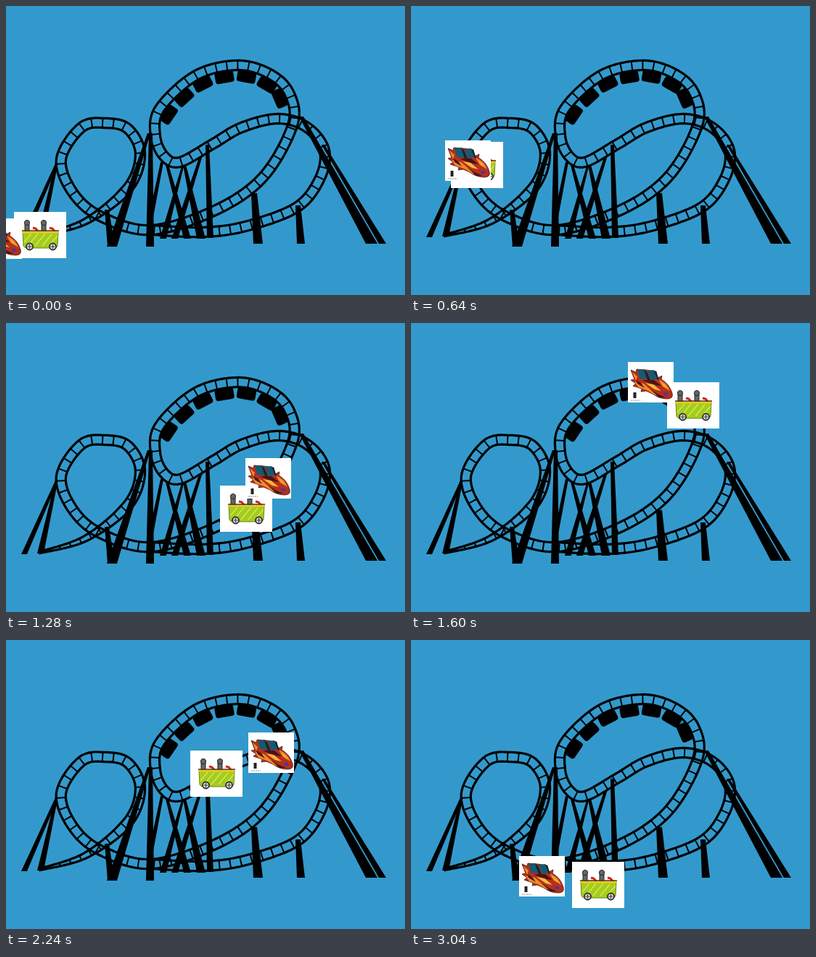
Recreate the animation shown at these times as an HTML page. Size 550 by 400 pixels, loop 3.2 s.

```html
<!DOCTYPE html>
<html>
<head>
<meta charset="utf-8">
<title>Roller coaster</title>
<style>
html, body { margin: 0; width: 100%; height: 100%; overflow: hidden; background: #39c; }
svg { display: block; }
</style>
</head>
<body>
<svg width="550" height="400" viewBox="0 0 550 400">
  <rect width="550" height="400" fill="#39c"/>
  <g id="supports">
    <path d="M68 218h4L29 320h-8zM66 226h4L52 319h-9zM195 176h4L153 333h-14zM197 176h5L204 333h-11zM136 282h6L150 333h-10z"/>
    <path d="M213 216h4L203 292h-6zM220 220h4L255 322h-10zM242 222h3L221 322h-9zM266 210h4L237 322h-9zM244 220h4L275 322h-12zM275 192h5L286 321h-9z"/>
    <path d="M338 259h8L354 329h-13zM399 276h7L412 329h-11zM404 153h6L512 329h-16zM435 192h4L524 329h-10z"/>
  </g>
  <path id="rails" fill="none" stroke="#000" stroke-width="3.2"/>
  <path id="ties" fill="none" stroke="#000" stroke-width="2"/>
  <g id="train"></g>

  <g id="cart">
    <rect width="72" height="64" fill="#fff"/>
    <g fill="#666" stroke="#222">
      <path d="M15 17h6v10h-6zM38 17h6v10h-6z"/>
      <circle cx="18" cy="15" r="3.6"/><circle cx="41" cy="15" r="3.6"/>
    </g>
    <path d="M26 22l4 1 4 5M49 22l4 1 4 5" fill="none" stroke="#c22" stroke-width="3"/>
    <path d="M12 28H61L60 47Q59 50 55 50H18Q14 50 13 47Z" fill="#a4cc20" stroke="#6f8420"/>
    <path d="M14 42l10-12M20 46l13-16M29 47l14-17M39 47l13-16M49 46l11-13" stroke="#d4e84a" stroke-width="1.5"/>
    <path d="M11 28H62" stroke="#f0c820" stroke-width="3"/>
    <path d="M11 26H62" stroke="#432" stroke-width="1.4"/>
    <g fill="#ccc" stroke="#222" stroke-width="1.6">
      <circle cx="21.5" cy="48" r="4.6"/><circle cx="53.5" cy="48" r="4.6"/>
    </g>
    <path d="M18.5 48h6M21.5 45v6M50.5 48h6M53.5 45v6" stroke="#444"/>
  </g>

  <g id="rocket">
    <rect width="63" height="56" fill="#fff"/>
    <path d="M4 11L11 14 12 10 25 11 39 13 41 22 47 19 46 24Q57 30 61 43Q63 51 54 51Q43 51 34 44L25 40 18 41 19 37 7 33 11 30 4 25 9 24Z" fill="#b62e1c" stroke="#4a1212" stroke-width=".8"/>
    <path d="M9 27L22 30 33 40 47 47 38 46 26 39 14 35ZM6 14L13 20 11 26ZM42 24Q54 29 58 40L48 34Z" fill="#ee8c26"/>
    <path d="M24 29L35 31 46 40 37 38ZM44 28L51 32 54 37Z" fill="#f3bc3a"/>
    <path d="M20 25L36 25 46 33 39 32 29 29ZM31 38L41 44 52 49 43 49ZM11 25L18 29 23 36 13 30Z" fill="#4a1218"/>
    <path d="M13 11L23 10 28 24 16 23ZM27 12L36 11 42 23 32 25Z" fill="#165a70"/>
    <path d="M22 11L26 13 31 25 27 25ZM36 12L39 14 43 24 41 25Z" fill="#102833"/>
    <path d="M49 42h6v4h-5z" fill="#4a3b8c"/>
    <path d="M7.5 42h4v8h-4z" fill="#222"/>
    <path d="M4 53h13" stroke="#888" stroke-dasharray="2 1"/>
  </g>
</svg>
<script>
const STEP = 160, STEPS = 20;
const byId = id => document.getElementById(id);
const points = text => text.split(' ').map(pair => pair.split(',').map(Number));

// Catmull-Rom curve, measured by distance; marks hold the distance of each key point
function makeCurve(keys) {
  const samples = [], marks = [], last = keys.length - 1;
  let s = 0;
  function add(x, y) {
    const p = samples[samples.length - 1];
    if (p) s += Math.hypot(x - p.x, y - p.y);
    samples.push({ x, y, s });
  }
  for (let i = 0; i < last; i++) {
    const [a, b, c, d] = [-1, 0, 1, 2].map(k => keys[Math.max(0, Math.min(last, i + k))]);
    for (let t = 0; t < 1; t += 1 / 32) {
      add(...b.map((v, k) => v + t / 2 * (c[k] - a[k]
        + t * (2 * a[k] - 5 * v + 4 * c[k] - d[k] + t * (3 * (v - c[k]) + d[k] - a[k])))));
      if (t === 0) marks.push(s);
    }
  }
  add(...keys[last]);
  marks.push(s);
  return { samples, marks, length: s };
}

// Point at a distance along the curve, with its direction
function pointAt({ samples }, s) {
  const i = Math.max(1, samples.findIndex(p => p.s >= s));
  const p = samples[i - 1], q = samples[i], f = (s - p.s) / (q.s - p.s);
  return {
    x: p.x + f * (q.x - p.x), y: p.y + f * (q.y - p.y),
    angle: Math.atan2(q.y - p.y, q.x - p.x)
  };
}

// Point beside the curve
function beside(curve, s, offset) {
  const { x, y, angle } = pointAt(curve, s);
  return [x - offset * Math.sin(angle), y + offset * Math.cos(angle)];
}

const track = makeCurve(points(
  '45,318 110,298 168,252 185,205 168,170 137,162 104,168 76,212 92,258 130,291 200,310 ' +
  '290,282 355,236 395,165 391,122 365,95 320,82 262,96 212,142 206,180 218,208 240,216 ' +
  '285,191 325,168 375,156 415,168 439,200 432,240 400,279 330,305 270,313 200,310'));
const halfWidth = s => Math.min(6.6, 1 + s / 24);

function rail(side) {
  let d = '';
  for (let s = 0.1; s < track.length; s += 3) d += (d ? 'L' : 'M') + beside(track, s, side * halfWidth(s));
  return d;
}
byId('rails').setAttribute('d', rail(-1) + rail(1));

let ties = '';
for (let s = 15; s < track.length; s += 15)
  ties += `M${beside(track, s, -halfWidth(s))}L${beside(track, s, halfWidth(s))}`;
byId('ties').setAttribute('d', ties);

// Seven cars hang inside the big loop, evenly spaced between two key points
const CARS = 7, [from, to] = [14, 18].map(k => track.marks[k]);
for (let k = 0; k < CARS; k++) {
  const s = from + (to - from) * k / (CARS - 1);
  const turn = pointAt(track, s).angle * 180 / Math.PI;
  byId('train').innerHTML += `<rect x="-13" y="-8" width="26" height="16" rx="4"
    transform="translate(${beside(track, s, -15)}) rotate(${turn})"/>`;
}

// Both vehicles share this route, each reaching its key points on the same beats
const route = makeCurve(points(
  '-10,322 47,317 138,282 186,217 137,168 78,214 91,220 165,300 245,298 331,257 361,215 ' +
  '389,114 330,82 237,117 221,200 290,185 365,156 435,199 414,271 361,320 258,339 180,327'));
const beats = [0, 4, 8, 10, 14, 17, 19];
const vehicles = [
  { id: 'cart', w: 72, h: 64, stops: [1, 6, 9, 11, 15, 18, 20] },
  { id: 'rocket', w: 62, h: 56, stops: [0, 5, 10, 12, 16, 19, 21] }
];

function draw() {
  const step = Math.floor(performance.now() / STEP) % STEPS;
  const k = Math.max(1, beats.findIndex(b => b >= step));
  const f = (step - beats[k - 1]) / (beats[k] - beats[k - 1]);
  for (const { id, w, h, stops } of vehicles) {
    const a = route.marks[stops[k - 1]], b = route.marks[stops[k]];
    const { x, y } = pointAt(route, a + f * (b - a));
    byId(id).setAttribute('transform', `translate(${Math.round(x - w / 2)} ${Math.round(y - h / 2)})`);
  }
  requestAnimationFrame(draw);
}
draw();
</script>
</body>
</html>
```
